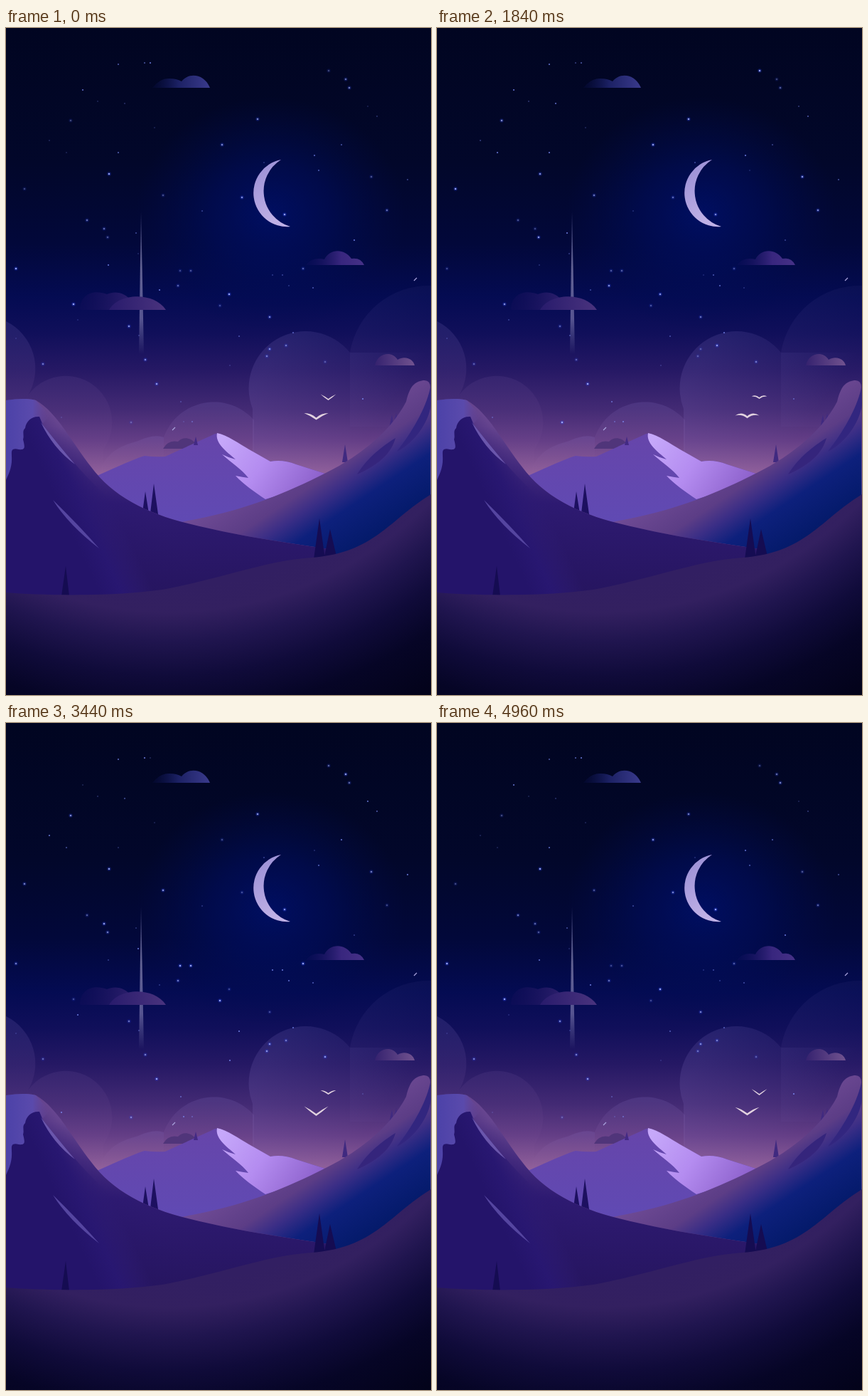
An HTML page for the animation above (5000 ms loop, 598 px wide and 937 px high).

```html
<!DOCTYPE html>
<html lang="en">
<head>
<meta charset="utf-8">
<title>Night valley</title>
<style>
html, body { margin: 0; width: 100%; height: 100%; overflow: hidden; background: #010420; }
svg { display: block; width: 100vw; height: 100vh; }
</style>
</head>
<body>
<svg viewBox="0 0 598 937" preserveAspectRatio="none">
  <defs>
    <linearGradient id="sky" gradientUnits="userSpaceOnUse" x1="0" y1="0" x2="0" y2="630">
      <stop offset="0" stop-color="#010521"/>
      <stop offset=".3" stop-color="#02072a"/>
      <stop offset=".48" stop-color="#02083a"/>
      <stop offset=".6" stop-color="#040b52"/>
      <stop offset=".68" stop-color="#100f5a"/>
      <stop offset=".76" stop-color="#251864"/>
      <stop offset=".85" stop-color="#432a74"/>
      <stop offset=".92" stop-color="#643e86"/>
      <stop offset="1" stop-color="#94639c"/>
    </linearGradient>
    <radialGradient id="glow">
      <stop offset="0" stop-color="#000f66" stop-opacity=".9"/>
      <stop offset=".45" stop-color="#000d5c" stop-opacity=".6"/>
      <stop offset="1" stop-color="#000b50" stop-opacity="0"/>
    </radialGradient>
    <linearGradient id="haze" x1="0" y1="0" x2="0" y2="1">
      <stop offset="0" stop-color="#9884d8" stop-opacity=".15"/>
      <stop offset=".55" stop-color="#a878b8" stop-opacity=".06"/>
      <stop offset="1" stop-color="#a878b0" stop-opacity="0"/>
    </linearGradient>
    <linearGradient id="hazeRight" gradientUnits="userSpaceOnUse" x1="380" y1="460" x2="520" y2="560">
      <stop offset="0" stop-color="#9884d8" stop-opacity=".15"/>
      <stop offset="1" stop-color="#9884d8" stop-opacity="0"/>
    </linearGradient>
    <linearGradient id="hazeFar" gradientUnits="userSpaceOnUse" x1="484" y1="400" x2="590" y2="480">
      <stop offset="0" stop-color="#9884d8" stop-opacity=".07"/>
      <stop offset="1" stop-color="#9884d8" stop-opacity=".02"/>
    </linearGradient>
    <linearGradient id="moon" x1="0" y1="0" x2=".4" y2="1">
      <stop offset="0" stop-color="#978cd4"/>
      <stop offset="1" stop-color="#c0b1e6"/>
    </linearGradient>
    <linearGradient id="beam" gradientUnits="userSpaceOnUse" x1="0" y1="258" x2="0" y2="458">
      <stop offset="0" stop-color="#8d8cc8" stop-opacity=".35"/>
      <stop offset=".4" stop-color="#908db8" stop-opacity=".68"/>
      <stop offset=".75" stop-color="#8580b4" stop-opacity=".62"/>
      <stop offset="1" stop-color="#8580b4" stop-opacity="0"/>
    </linearGradient>
    <linearGradient id="cloudA"><stop offset="0" stop-color="#0a104c" stop-opacity=".2"/><stop offset=".45" stop-color="#1c2164"/><stop offset="1" stop-color="#3a3a8c"/></linearGradient>
    <linearGradient id="cloudB"><stop offset="0" stop-color="#120e5c" stop-opacity=".2"/><stop offset=".6" stop-color="#38267e"/><stop offset="1" stop-color="#463187"/></linearGradient>
    <linearGradient id="cloudBack"><stop offset="0" stop-color="#120d58" stop-opacity=".4"/><stop offset="1" stop-color="#30216f"/></linearGradient>
    <linearGradient id="cloudC"><stop offset="0" stop-color="#281b6c"/><stop offset="1" stop-color="#4a337e"/></linearGradient>
    <linearGradient id="cloudD"><stop offset="0" stop-color="#35226f"/><stop offset="1" stop-color="#71528f"/></linearGradient>
    <linearGradient id="peak" x1="0" y1="0" x2="0" y2="1">
      <stop offset="0" stop-color="#6645aa"/>
      <stop offset="1" stop-color="#5e4bb6"/>
    </linearGradient>
    <linearGradient id="snow" x1="0" y1=".2" x2="1" y2=".6">
      <stop offset="0" stop-color="#c6a8fa"/>
      <stop offset=".45" stop-color="#b48cf0"/>
      <stop offset="1" stop-color="#8b5fca"/>
    </linearGradient>
    <linearGradient id="right" gradientUnits="userSpaceOnUse" x1="420" y1="585" x2="510" y2="720">
      <stop offset="0" stop-color="#6e4a94"/>
      <stop offset=".33" stop-color="#5c3d86"/>
      <stop offset=".48" stop-color="#3b2e86"/>
      <stop offset=".67" stop-color="#0d207c"/>
      <stop offset="1" stop-color="#041a6a"/>
    </linearGradient>
    <linearGradient id="ridge" gradientUnits="userSpaceOnUse" x1="105" y1="585" x2="40" y2="645">
      <stop offset="0" stop-color="#684690"/>
      <stop offset=".5" stop-color="#42297d"/>
      <stop offset="1" stop-color="#27176c"/>
    </linearGradient>
    <linearGradient id="shade" gradientUnits="userSpaceOnUse" x1="0" y1="560" x2="0" y2="800">
      <stop offset="0" stop-color="#2b1870" stop-opacity="0"/>
      <stop offset=".45" stop-color="#2b1870" stop-opacity=".95"/>
      <stop offset="1" stop-color="#26155f"/>
    </linearGradient>
    <linearGradient id="ice" gradientUnits="userSpaceOnUse" x1="0" y1="0" x2="62" y2="0">
      <stop offset="0" stop-color="#4c42a8"/>
      <stop offset=".6" stop-color="#5a4aac"/>
      <stop offset="1" stop-color="#6b4794" stop-opacity="0"/>
    </linearGradient>
    <linearGradient id="dark" gradientUnits="userSpaceOnUse" x1="60" y1="640" x2="125" y2="610">
      <stop offset="0" stop-color="#24146a"/>
      <stop offset=".4" stop-color="#281771"/>
      <stop offset="1" stop-color="#2f1c74" stop-opacity="0"/>
    </linearGradient>
    <radialGradient id="front" gradientUnits="userSpaceOnUse" cx="230" cy="310" r="740">
      <stop offset=".64" stop-color="#321f62"/>
      <stop offset=".69" stop-color="#332060"/>
      <stop offset=".745" stop-color="#20154f"/>
      <stop offset=".81" stop-color="#100b3a"/>
      <stop offset=".88" stop-color="#060526"/>
      <stop offset="1" stop-color="#020217"/>
    </radialGradient>
    <radialGradient id="halo">
      <stop offset="0" stop-color="#6d86ff" stop-opacity=".7"/>
      <stop offset="1" stop-color="#1f3cff" stop-opacity="0"/>
    </radialGradient>
    <path id="hill" d="M0 523C16 521 30 520 42 523C72 540 91 580 120 617C150 658 200 683 260 697C320 712 380 721 455 732V810H0Z"/>
  </defs>

  <rect width="598" height="937" fill="url(#sky)"/>
  <ellipse cx="372" cy="262" rx="190" ry="165" fill="url(#glow)"/>

  <path fill="url(#haze)" d="M0 412A74 74 0 0 1 31 516A64 64 0 0 1 137 592V640H0Z"/>
  <path fill="url(#haze)" d="M135 615C148 590 170 585 186 580Q208 570 222 575V630H135Z"/>
  <path fill="url(#haze)" d="M222 575A75 75 0 0 1 349 551V640H222Z"/>
  <path fill="url(#hazeRight)" d="M347 640V535A80 80 0 0 1 484 456H598V640Z"/>
  <path fill="url(#hazeFar)" d="M484 456A112 112 0 0 1 598 362V560H484Z"/>

  <path fill="url(#moon)" d="M387 185A47.5 47.5 0 0 0 400 279A52 52 0 0 1 387 185Z"/>
  <g id="stars"></g>
  <path fill="url(#beam)" d="M190 258L194 458H187Z"/>

  <path fill="url(#cloudA)" d="M206 84Q217 70 230 71Q240 71 247 75C257 62 279 64 287 84Z"/>
  <path fill="url(#cloudB)" d="M422 333Q431 321 448 325C455 310 476 309 486 324Q499 322 504 333Z"/>
  <path fill="url(#cloudBack)" d="M104 396C104 376 120 366 142 374C154 368 170 373 175 383L180 396Z"/>
  <path fill="url(#cloudC)" d="M145 396C158 372 208 370 225 396Z"/>
  <path fill="url(#cloudD)" d="M519 474C523 456 543 453 551 466C560 460 573 464 575 474Z"/>
  <path fill="#50357a" d="M221 591Q228 578 242 581C249 573 264 574 271 591Z"/>

  <path fill="url(#peak)" d="M128 629C158 616 178 606 195 601Q210 603 224 602L290 572Q297 567 304 572L372 609Q390 606 408 613L452 627L440 730H200Z"/>
  <path fill="url(#snow)" d="M297 569C312 572 328 584 342 592L372 609Q390 606 408 613L452 627Q410 650 365 662C350 652 334 641 323 629Q333 631 341 632C332 620 317 611 304 599Q314 604 323 606C309 594 294 583 297 569Z"/>
  <path fill="#432a84" d="M267 574L270 586H264Z"/>

  <path fill="#402a80" d="M477 585L481 610H473ZM543 543L546 562H539ZM549 541L552 558H545Z"/>
  <path fill="url(#right)" d="M240 695C320 682 380 660 440 630C500 602 542 565 563 525C568 503 575 497 587 495Q597 494 597 505L598 780H240Z"/>
  <path fill="#35257c" d="M548 576C530 587 508 604 494 627C520 615 541 601 548 576Z"/>
  <path fill="#32267f" d="M597 505C592 532 572 567 550 595C579 580 597 548 598 527Z"/>

  <path fill="#1d1060" d="M196 651L202 688H191ZM208 640L215 690H202Z"/>
  <use href="#hill" fill="url(#ridge)"/>
  <use href="#hill" fill="url(#shade)"/>
  <path fill="url(#ice)" d="M0 523C16 521 30 520 42 523L62 545L47 560L30 640H0Z"/>
  <path fill="url(#dark)" d="M47 546C36 545 28 553 27 562C22 566 26 572 24 578C27 590 27 593 18 592C6 589 8 596 8 602C9 618 3 628 0 635V810H300L260 720C180 700 130 650 97 612C75 598 58 575 47 546Z"/>
  <path fill="#6a56ac" d="M49 554Q66 590 97 613Q74 586 49 554Z"/>
  <path fill="#5545a0" d="M66 663Q88 698 131 731Q102 698 66 663Z"/>

  <path fill="#150c52" d="M441 689L449 746H433ZM456 704L465 742H448ZM84 756L89 798H78Z"/>
  <path fill="url(#front)" d="M0 793C60 798 180 799 240 785C320 768 370 748 430 744C490 740 520 715 545 695Q575 669 598 655V937H0Z"/>

  <path stroke="#a9a2dc" stroke-width="1.2" d="M574 355L578 351M234 565L238 561"/>
  <g fill="#e2d2df"><path id="farBird"/><path id="nearBird"/></g>
</svg>

<script>
const LOOP = 5000, STEP = 40;
const NS = 'http://www.w3.org/2000/svg';

// x, y pairs
const bright = [
  91,130, 145,205, 221,235, 26,226, 114,270, 138,282, 143,294, 332,238, 392,262,
  478,72, 454,60, 483,84, 354,128, 304,164, 536,256, 514,209, 245,341, 260,341,
  242,362, 314,374, 371,406, 394,446, 371,451, 367,461, 196,466, 52,472, 14,338,
  173,419, 212,500, 418,338, 301,390, 176,554, 449,469, 95,388
];
const faint = [
  158,51, 195,49, 203,49, 108,87, 129,103, 209,140, 167,106, 61,158, 144,333,
  216,368, 432,365, 398,362, 375,347, 389,347, 328,433, 315,474, 434,179, 490,298,
  565,213, 522,124, 509,110, 472,164, 440,200, 262,553, 246,525, 250,553, 502,521,
  78,547, 404,428, 187,432, 101,410, 158,175, 85,175, 183,288, 363,189, 276,257,
  14,436, 283,80, 186,317
];

let seed = 11;
const rand = () => (seed = (seed * 16807) % 2147483647) / 2147483647;
const sky = document.getElementById('stars');

function circle(parent, x, y, r, fill) {
  const c = document.createElementNS(NS, 'circle');
  for (const [k, v] of Object.entries({ cx: x, cy: y, r, fill })) c.setAttribute(k, v);
  parent.append(c);
}

function makeStars(list, core, halo, low) {
  const stars = [];
  for (let i = 0; i < list.length; i += 2) {
    const el = document.createElementNS(NS, 'g');
    circle(el, list[i], list[i + 1], halo, 'url(#halo)');
    circle(el, list[i], list[i + 1], core, '#b0baff');
    sky.append(el);
    stars.push({ el, low, cycles: 2 + Math.floor(rand() * 4), phase: rand() });
  }
  return stars;
}

const stars = [...makeStars(bright, 1.1, 3.4, .4), ...makeStars(faint, .7, 1.7, .25)];
const wave = (u, cycles, phase) => Math.cos(2 * Math.PI * (u * cycles + phase));

// lift runs from -1 (wings down) to 1 (wings up)
function bird(x, y, size, lift) {
  const tip = -1 - 5.5 * lift, body = 2 + 3.5 * lift, elbow = -3 + 1.7 * lift;
  const bend = 2 * elbow - (tip + body) / 2;
  const p = (a, b) => `${(x + a * size).toFixed(2)} ${(y + b * size).toFixed(2)}`;
  return `M${p(-17, tip)}Q${p(-8, bend)} ${p(0, body - 1.5)}Q${p(8, bend)} ${p(17, tip)}` +
    `Q${p(8, bend + 4)} ${p(0, body + 1.5)}Q${p(-8, bend + 4)} ${p(-17, tip)}Z`;
}

const near = document.getElementById('nearBird');
const far = document.getElementById('farBird');

function draw(now) {
  const u = Math.floor((now % LOOP) / STEP) * STEP / LOOP;
  for (const s of stars) {
    const glow = .5 + .5 * wave(u, s.cycles, s.phase);
    s.el.setAttribute('opacity', (s.low + (1 - s.low) * glow).toFixed(3));
  }
  near.setAttribute('d', bird(436.5, 545, 1, wave(u, 7, .16)));
  far.setAttribute('d', bird(453.5, 518.5, .64, wave(u, 6, .03)));
  requestAnimationFrame(draw);
}
requestAnimationFrame(draw);
</script>
</body>
</html>
```
